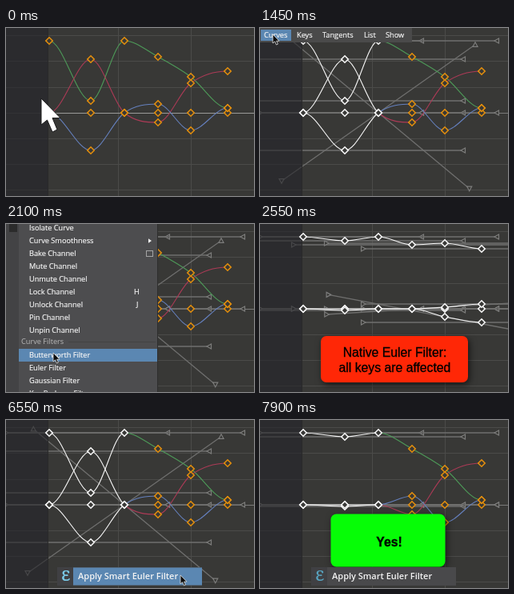
Recreate the animation shown at these times as an HTML page. Size 310 by 210 pixels, loop 8 s.

```html
<!DOCTYPE html>
<html lang="en">
<head>
<meta charset="utf-8">
<title>Euler filter comparison</title>
<style>
html, body { margin: 0; width: 100%; height: 100%; overflow: hidden; background: #383836; }
svg { display: block; width: 310px; height: 210px; }
text { font: 9.2px "Open Sans", "Noto Sans", sans-serif; fill: #f4f4f4; stroke: #f4f4f4; stroke-width: .2; }
.label text { font: 15.75px "Liberation Sans", Arial, sans-serif; fill: #000; stroke: #000; stroke-width: .3; text-anchor: middle; }
.label { filter: drop-shadow(2px 3px 4px rgba(0, 0, 0, .6)); }
.label .bold { font-weight: bold; }
.dim { fill: #b9b9b9; stroke: none; }
.icon { font: 23px "Noto Serif", serif; fill: #58a5c2; stroke: none; }
.lit { fill: #7cc8e4; }
.caption { font-size: 11px; font-weight: 600; stroke: none; }
.grid { stroke: #4b4b49; fill: none; }
.tangent { stroke: #6f6f6e; stroke-width: 1.3; fill: none; }
.handle { stroke: #7d7d7c; stroke-width: 1.2; fill: #383836; }
.curve { fill: none; stroke-width: 1.1; }
.key { fill: #383836; stroke-width: 1.6; }

/* shown and hidden states */
.timed { visibility: hidden; animation: 8s step-end infinite; }
#plain { animation-name: plain; }
#picked { animation-name: picked; }
#native { animation-name: native; }
#smart { animation-name: smart; }
#marquee { animation: marquee 8s infinite, marqueeOn 8s step-end infinite; }
#bar { animation-name: bar; }
#barHover { animation-name: barHover; }
#menu { animation-name: menu; }
#note { animation-name: note; }
#yes { animation-name: yes; }
#button { animation-name: button; }
#buttonHover { animation-name: buttonHover; }
@keyframes plain { 0% { visibility: visible } 8.125%, 100% { visibility: hidden } }
@keyframes picked {
  0% { visibility: hidden } 8.125% { visibility: visible } 30.625% { visibility: hidden }
  67.5% { visibility: visible } 91.25%, 100% { visibility: hidden }
}
@keyframes native { 0% { visibility: hidden } 30.625% { visibility: visible } 67.5%, 100% { visibility: hidden } }
@keyframes smart { 0% { visibility: hidden } 91.25%, 100% { visibility: visible } }
@keyframes marqueeOn { 0% { visibility: hidden } 4.375% { visibility: visible } 8.125%, 100% { visibility: hidden } }
@keyframes bar { 0% { visibility: hidden } 15.625% { visibility: visible } 30.625%, 100% { visibility: hidden } }
@keyframes barHover { 0% { visibility: hidden } 17.5% { visibility: visible } 30.625%, 100% { visibility: hidden } }
@keyframes menu { 0% { visibility: hidden } 19.375% { visibility: visible } 30.625%, 100% { visibility: hidden } }
@keyframes note { 0% { visibility: hidden } 31.875% { visibility: visible } 67.5%, 100% { visibility: hidden } }
@keyframes yes { 0% { visibility: hidden } 93.75%, 100% { visibility: visible } }
@keyframes button { 0% { visibility: hidden } 67.5%, 100% { visibility: visible } }
@keyframes buttonHover { 0% { visibility: hidden } 80.625% { visibility: visible } 98.125%, 100% { visibility: hidden } }

/* motion at 20 steps per second */
#bigCursor { animation: bigMove 8s infinite, bigOn 8s step-end infinite; }
#cursor { animation: move 8s infinite, cursorOn 8s step-end infinite; }
#roll { animation: roll 8s infinite; }
#rowHover { animation: rowHover 8s step-end infinite; }
@keyframes marquee {
  0%, 3.75% { width: 0; height: 0; animation-timing-function: steps(5) }
  6.875%, 100% { width: 169px; height: 165px }
}
@keyframes bigOn { 0% { visibility: visible } 15.625%, 100% { visibility: hidden } }
@keyframes bigMove {
  0% { transform: translate(44px, 88px); animation-timing-function: steps(4) }
  2.5% { transform: translate(2px, 2px) }
  3.75% { transform: translate(2px, 2px); animation-timing-function: steps(5) }
  6.875% { transform: translate(171px, 167px) }
  9.375% { transform: translate(171px, 167px); animation-timing-function: steps(5) }
  12.5%, 100% { transform: translate(137px, 112px) }
}
@keyframes cursorOn {
  0% { visibility: hidden } 15.625% { visibility: visible } 30.625% { visibility: hidden }
  70% { visibility: visible } 70.625% { visibility: hidden }
  80.625% { visibility: visible } 98.75%, 100% { visibility: hidden }
}
@keyframes move {
  0%, 16.25% { transform: translate(60px, 46px); animation-timing-function: steps(3) }
  18.125% { transform: translate(16px, 8px) }
  21.25% { transform: translate(16px, 8px); animation-timing-function: steps(3) }
  23.125% { transform: translate(54px, 136px); animation-timing-function: steps(6) }
  26.875% { transform: translate(60px, 166px) }
  30.625% { transform: translate(60px, 166px); animation-timing-function: step-end }
  31% { transform: translate(281px, 199px) }
  71% { transform: translate(281px, 199px); animation-timing-function: step-end }
  72% { transform: translate(226px, 194px) }
  81.25% { transform: translate(226px, 194px); animation-timing-function: steps(7) }
  85.625% { transform: translate(170px, 193px) }
  96.875% { transform: translate(170px, 193px); animation-timing-function: steps(2) }
  98.125%, 100% { transform: translate(293px, 198px) }
}
@keyframes roll {
  0%, 21.25% { transform: translateY(14px); animation-timing-function: steps(3) }
  23.125% { transform: translateY(0); animation-timing-function: steps(6) }
  26.875%, 100% { transform: translateY(-66px) }
}
@keyframes rowHover {
  0% { transform: translateY(-40px) }
  21.875% { transform: translateY(40px) }
  22.5% { transform: translateY(92px) }
  23.125% { transform: translateY(140px) }
  23.75% { transform: translateY(156px) }
  24.375% { transform: translateY(172px) }
  25% { transform: translateY(188px) }
  26.25% { transform: translateY(219px) }
  26.875%, 100% { transform: translateY(235px) }
}
</style>
</head>
<body>
<svg viewBox="0 0 310 210">
  <rect width="310" height="210" fill="#383836"/>
  <path class="grid" d="M0 9.5H310M0 41.5H310M0 74.5H310M0 106.5H310M0 138.5H310M0 170.5H310M0 202.5H310M140.5 0V210M231.5 0V210"/>

  <g id="plain" class="timed"></g>
  <g id="picked" class="timed"></g>
  <g id="native" class="timed"></g>
  <g id="smart" class="timed"></g>
  <rect id="marquee" class="timed" x="2.5" y="2.5" fill="none" stroke="#d8d8d8"/>

  <g id="roll">
    <g id="menu" class="timed">
      <rect y="4" width="189" height="300" fill="#4d4d4f"/>
      <rect y="16" width="16" height="288" fill="#434345"/>
      <path d="M2 7.5H187M2 10.5H187" stroke="#343434" stroke-dasharray="2 2"/>
      <path d="M16 16.5H188M16 50.5H188M78 202.5H187" stroke="#434343"/>
      <rect x="4" y="55" width="10" height="10" fill="#2b2b2b"/>
      <rect id="rowHover" x="16" y="-8" width="173" height="16" fill="#5b87b2"/>
      <path d="M189.5 4V304" stroke="#2e2e2e"/>
      <rect x="175.5" y="88.5" width="8" height="7" fill="none" stroke="#a4a4a4"/>
      <g id="rows"></g>
    </g>
    <g id="bar" class="timed">
      <rect y="-14" width="190" height="18" fill="#4a4a4a"/>
      <rect id="barHover" class="timed" x="1" y="-12" width="38" height="14" fill="#5b87b2"/>
      <g id="titles"></g>
    </g>
  </g>

  <g id="note" class="timed label">
    <rect x="76" y="140" width="184" height="58" rx="7" fill="#ff2706"/>
    <text x="168.5" y="166">Native Euler Filter:</text>
    <text x="168.5" y="185">all keys are affected</text>
  </g>
  <g id="yes" class="timed label">
    <rect x="88.5" y="117.5" width="143" height="66" rx="7" fill="#06fd06"/>
    <text class="bold" x="161.5" y="157.5">Yes!</text>
  </g>

  <g id="button" class="timed">
    <rect x="64" y="184" width="181" height="23" fill="#49494b"/>
    <rect x="64" y="184" width="20" height="23" fill="#404043"/>
    <text class="icon" x="69" y="201">ε</text>
    <g id="buttonHover" class="timed">
      <rect x="84" y="184.5" width="161" height="22" fill="#5b87b2"/>
      <text class="icon lit" x="69" y="201">ε</text>
    </g>
    <text class="caption" x="90" y="199">Apply Smart Euler Filter</text>
  </g>

  <path id="cursor" class="timed" d="M0 0V11L2.6 8.8 4.4 13 6.4 12.1 4.6 8.2H8Z" fill="#0c0c0c" stroke="#e8e8e8" stroke-width=".8"/>
  <path id="bigCursor" class="timed" d="M0 0V33L7.5 27 14 42 20 39 14 24.5H24Z" fill="#fff" stroke="#1c1c1c"/>
</svg>
<script>
const $ = id => document.getElementById(id);
const X = [54, 106, 148, 190, 231, 277];
const ORANGE = '#e28e0e', WHITE = '#f6f6f6', REACH = 148;
const GREEN = '#4d9a58', RED = '#ac3a56', BLUE = '#6580be';

const channel = (color, ys, slopes = []) =>
  ({ color, keys: X.map((x, i) => ({ x, y: ys[i], m: slopes[i] || 0 })) });

const flat = channel('none', X.map(() => 106));
const source = [
  flat,
  channel(GREEN, [16, 91, 16, 36, 61, 100], [0, 0, 0, .54, .74, 0]),
  channel(RED, [106, 39, 106, 118, 69, 54], [0, 0, .833, 0, -.74, 0]),
  channel(BLUE, [106, 153, 106, 95, 128, 100], [0, 0, -.704, 0, 0, 0])
];
const nativeResult = [
  flat,
  channel(GREEN, [16, 21, 16, 26, 24, 31]),
  channel(RED, [106, 106, 106, 106, 104, 100], [0, 0, 0, 0, -.061, 0]),
  channel(BLUE, [106, 108, 106, 106, 116, 123], [0, 0, 0, 0, .19, 0])
];
const smartResult = [
  flat,
  channel(GREEN, [16, 21, 16, 36, 61, 100], [0, 0, 0, .54, .74, 0]),
  channel(RED, [106, 108, 106, 118, 69, 54], [0, 0, 0, 0, -.74, 0]),
  channel(BLUE, [106, 106, 106, 95, 128, 100])
];

function segment(a, b, color) {
  const d = (b.x - a.x) / 3;
  return `<path class="curve" stroke="${color}" d="M${a.x} ${a.y}C${a.x + d} ${a.y + a.m * d} ` +
    `${b.x - d} ${b.y - b.m * d} ${b.x} ${b.y}"/>`;
}

function handle(x, y, side, m) {
  const turn = Math.abs(m) > .5 ? (side * m > 0 ? -90 : 90) : side > 0 ? 0 : 180;
  return `<path class="handle" d="M-3 0L2.5-3V3Z" transform="translate(${x} ${y}) rotate(${turn})"/>`;
}

function tangent({ x, y, m }) {
  const dx = REACH / Math.hypot(1, m), dy = dx * m;
  return `<path class="tangent" d="M${x - dx} ${y - dy}L${x + dx} ${y + dy}"/>` +
    handle(x - dx, y - dy, -1, m) + handle(x + dx, y + dy, 1, m);
}

const diamond = ({ x, y }, color) =>
  `<path class="key" stroke="${color}" d="M${x} ${y - 4.2}l4.2 4.2-4.2 4.2-4.2-4.2z"/>`;

// The first `picked` keys of every channel are selected.
function draw(id, channels, picked) {
  let under = `<path d="M54 106.5H310" stroke="${picked ? '#7b7b7a' : '#9a9a98'}"/>`;
  let curves = '', keys = '';
  for (const { color, keys: list } of channels) {
    list.forEach((k, i) => {
      const next = list[i + 1];
      if (i < picked) under += tangent(k);
      if (next && color !== 'none') curves += segment(k, next, i + 1 < picked ? WHITE : color);
      keys += diamond(k, i < picked ? WHITE : ORANGE);
    });
  }
  const panel = '<rect width="52" height="210" fill="#242428" opacity=".6"/>' +
    '<path d="M52.5 0V210" stroke="#2a2a2a"/>';
  $(id).innerHTML = under + panel + curves + keys;
}

draw('plain', source, 0);
draw('picked', source, 3);
draw('native', nativeResult, 6);
draw('smart', smartResult, 3);

const text = (x, y, s, name = '') => `<text class="${name}" x="${x}" y="${y}">${s}</text>`;
const rows = [
  [24, 'Pre Infinity', '>'], [40, 'Post Infinity', '>'], [60, 'Isolate Curve'],
  [76, 'Curve Smoothness', '>'], [92, 'Bake Channel'], [108, 'Mute Channel'],
  [124, 'Unmute Channel'], [140, 'Lock Channel', 'H'], [156, 'Unlock Channel', 'J'],
  [172, 'Pin Channel'], [188, 'Unpin Channel'], [219, 'Butterworth Filter'],
  [235, 'Euler Filter'], [251, 'Gaussian Filter'], [267, 'Key Reducer Filter'],
  [283, 'Peak Removal Filter']
];
const arrow = y => `<path d="M178 ${y - 2.8}l4 2.8-4 2.8z" fill="#f4f4f4"/>`;
$('rows').innerHTML = text(19, 205, 'Curve Filters', 'dim') +
  rows.map(([y, name, mark]) => text(29, y + 3.3, name) +
    (mark === '>' ? arrow(y) : mark ? text(mark === 'H' ? 160 : 163, y + 3.3, mark) : '')).join('');
$('titles').innerHTML = [[5, 'Curves'], [46, 'Keys'], [78, 'Tangents'], [130, 'List'], [157, 'Show']]
  .map(([x, name]) => text(x, -2.2, name)).join('');
</script>
</body>
</html>
```
